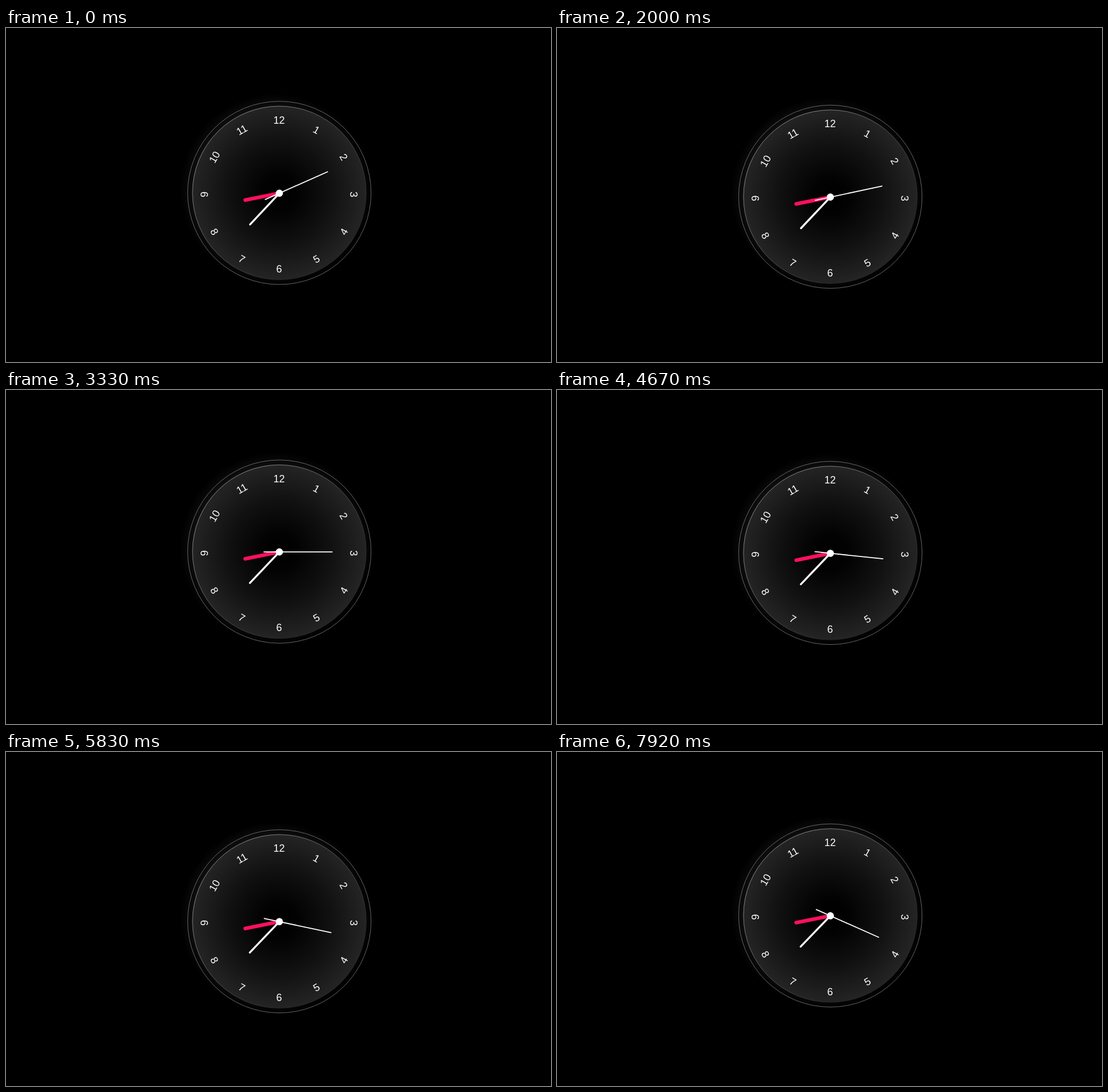
An HTML page for the animation above (8000 ms loop, 955 by 586 pixels).

```html
<!DOCTYPE html>
<html lang="en">
<head>
<meta charset="utf-8">
<title>Floating clock</title>
<style>
  html, body { margin: 0; width: 100%; height: 100%; overflow: hidden; background: #000; }
  svg { display: block; width: 100%; height: 100%; }
  text { font: 18px "Liberation Sans", Arial, sans-serif; fill: #fff; text-anchor: middle; }
  line { stroke: #fff; stroke-linecap: round; }
</style>
</head>
<body>
<svg viewBox="0 0 955 586">
  <defs>
    <radialGradient id="face">
      <stop offset="0" stop-color="#000"/>
      <stop offset=".2" stop-color="#020202"/>
      <stop offset=".6" stop-color="#111"/>
      <stop offset="1" stop-color="#242424"/>
    </radialGradient>
    <radialGradient id="glow">
      <stop offset=".86" stop-color="#0e0e0e"/>
      <stop offset="1" stop-color="#000"/>
    </radialGradient>
    <linearGradient id="rim" x1="0" y1="0" x2="1" y2="1">
      <stop offset=".2" stop-color="#858585"/>
      <stop offset=".75" stop-color="#2a2a2a"/>
    </linearGradient>
  </defs>
  <g id="clock">
    <circle cx="-6" cy="-6" r="168" fill="url(#glow)"/>
    <circle r="160.7" fill="none" stroke="#686868"/>
    <circle r="152.2" fill="url(#face)" stroke="url(#rim)"/>
    <g id="numbers" transform="translate(-.4 2.6)"></g>
    <g transform="translate(0 .6)">
      <line id="hour" y2="-61" style="stroke:#ff105e" stroke-width="6.4"/>
      <line id="minute" y2="-75" stroke-width="3.4"/>
      <line id="second" y1="27" y2="-92.5" stroke-width="1.8"/>
      <circle r="6.3" fill="#fff"/>
    </g>
  </g>
</svg>
<script>
  const LOOP = 8000, FPS = 12;
  const FLOAT = 5000, LOWEST = 1340;   // bobbing period and time of its lowest point
  const START = 8 * 3600 + 37 * 60 + 11;
  const $ = id => document.getElementById(id);

  function addNumbers() {
    for (let n = 1; n <= 12; n++) {
      const a = n * Math.PI / 6;
      const turn = n * 30 + (n > 3 && n < 9 ? 180 : 0);   // lower half stays readable
      const text = document.createElementNS("http://www.w3.org/2000/svg", "text");
      const x = 130.8 * Math.sin(a), y = -130.8 * Math.cos(a);
      text.setAttribute("transform", `translate(${x} ${y}) rotate(${turn})`);
      text.setAttribute("y", 6.4);
      text.textContent = n;
      $("numbers").append(text);
    }
  }

  // cubic-bezier(.42, 0, .58, 1)
  function easeInOut(x) {
    let lo = 0, hi = 1;
    for (let i = 0; i < 24; i++) {
      const s = (lo + hi) / 2, r = 1 - s;
      if (1.26 * s * r * r + 1.74 * s * s * r + s ** 3 < x) lo = s; else hi = s;
    }
    return lo * lo * (3 - 2 * lo);
  }

  const rotate = (id, deg) => $(id).setAttribute("transform", `rotate(${deg})`);

  function draw(time) {
    const t = Math.floor((time % LOOP + 5) * FPS / 1000) * 1000 / FPS;
    const phase = ((t - LOWEST + FLOAT) % FLOAT) / FLOAT;
    const y = 282.2 + 16.2 * easeInOut(Math.abs(1 - 2 * phase));
    $("clock").setAttribute("transform", `translate(479 ${y})`);

    const now = START + Math.floor((t + 750) / 1000);
    rotate("second", now % 60 * 6);
    rotate("minute", now % 3600 / 10);
    rotate("hour", now / 120);
  }

  addNumbers();
  const begin = performance.now();
  function tick() {
    draw(performance.now() - begin);
    requestAnimationFrame(tick);
  }
  tick();
</script>
</body>
</html>
```
